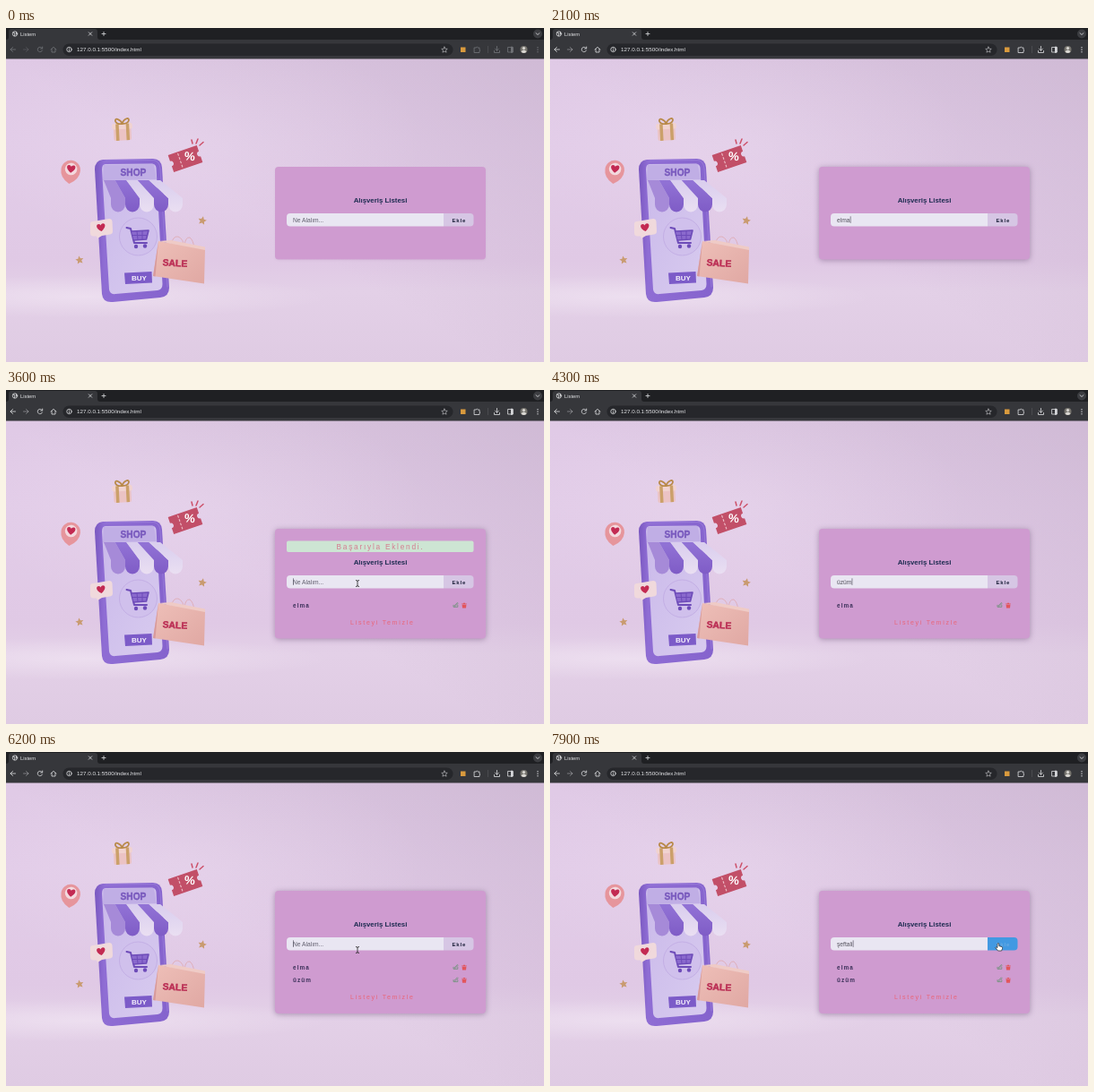
An HTML page for the animation above (8 s loop, 600 px wide and 373 px high).

```html
<!DOCTYPE html>
<html lang="tr">
<head>
<meta charset="utf-8">
<title>Listem</title>
<style>
  html, body { margin: 0; width: 100%; height: 100%; overflow: hidden; background: #dfc9e4; }
  svg { display: block; width: 100vw; height: 100vh; }
  text { font-family: "Liberation Sans", Arial, sans-serif; white-space: pre; }
  .bold { font-weight: 700; }
  .mid { text-anchor: middle; }
  .line { fill: none; stroke-linecap: round; stroke-linejoin: round; }
  .icons { color: #d5d6d9; }
  .icons .line { stroke: currentColor; stroke-width: .85; }
  #actions { color: #707276; }
  #actions.on { color: #d5d6d9; }
  .entry { font-size: 6.7px; }
</style>
</head>
<body>
<svg viewBox="0 0 600 373" preserveAspectRatio="none">
  <defs>
    <linearGradient id="wall" x1="0" y1="0" x2="0" y2="1">
      <stop offset="0" stop-color="#dfc9e5"/>
      <stop offset=".35" stop-color="#e2cce8"/>
      <stop offset=".7" stop-color="#e0c9e5"/>
      <stop offset=".79" stop-color="#e3d0e7"/>
      <stop offset="1" stop-color="#dfcbe3"/>
    </linearGradient>
    <linearGradient id="dusk" x1="1" y1="0" x2=".45" y2=".55">
      <stop offset="0" stop-color="#bda8c2" stop-opacity=".5"/>
      <stop offset="1" stop-color="#bda8c2" stop-opacity="0"/>
    </linearGradient>
    <radialGradient id="glow">
      <stop offset="0" stop-color="#f1e5f3" stop-opacity=".7"/>
      <stop offset="1" stop-color="#f1e5f3" stop-opacity="0"/>
    </radialGradient>
    <linearGradient id="body" x1="0" x2="1">
      <stop offset="0" stop-color="#7957c0"/>
      <stop offset=".12" stop-color="#8f6dd4"/>
      <stop offset="1" stop-color="#8563cd"/>
    </linearGradient>
    <linearGradient id="screen" x1="0" y1="0" x2="1" y2="1">
      <stop offset="0" stop-color="#cab9ea"/>
      <stop offset="1" stop-color="#d8cbef"/>
    </linearGradient>
    <linearGradient id="bag" x1="0" y1="0" x2="1" y2="1">
      <stop offset="0" stop-color="#eebfb8"/>
      <stop offset="1" stop-color="#e0a8a3"/>
    </linearGradient>
    <linearGradient id="violet" x1="0" y1="0" x2="0" y2="1">
      <stop offset="0" stop-color="#9273d6"/>
      <stop offset="1" stop-color="#7f5cc6"/>
    </linearGradient>
    <linearGradient id="pale" x1="0" y1="0" x2="0" y2="1">
      <stop offset="0" stop-color="#d9cdee"/>
      <stop offset="1" stop-color="#eadff2"/>
    </linearGradient>
    <path id="heart" d="M0 4.6C-6 .6-5.4-3.6-2.8-3.8C-1.2-4-.3-2.9 0-2C.3-2.9 1.2-4 2.8-3.8C5.4-3.6 6 .6 0 4.6Z" fill="#c32a52"/>
    <path id="star" d="M0-5L1.5-1.7L5-1.4L2.3 1L3.2 4.5L0 2.7L-3.2 4.5L-2.3 1L-5-1.4L-1.5-1.7Z"/>
    <g id="tools">
      <path class="line" d="M0 2.8V4.8H4.8V2.8M1 3.4L4.4 0L5.2 .8L1.9 4Z" stroke="#6d9278" stroke-width=".8"/>
      <path d="M9.2 .9H11V.2H13V.9H14.8V1.8H9.2ZM9.6 2.2H14.4L14 6H10Z" fill="#e2555c"/>
    </g>
  </defs>

  <rect width="600" height="373" fill="url(#wall)"/>
  <rect width="600" height="373" fill="url(#dusk)"/>
  <ellipse cx="210" cy="125" rx="260" ry="120" fill="url(#glow)" opacity=".35"/>
  <ellipse cx="90" cy="300" rx="270" ry="24" fill="url(#glow)"/>

  <!-- phone -->
  <path d="M108 147L164 146Q173 146 174 156L182 290Q182 300 172 301L119 306Q108 307 107 297L99 158Q99 148 108 147Z" fill="url(#body)"/>
  <path class="line" d="M111 148L164 147.500Q171 148 172 157L180 289" stroke="#9b7edb" stroke-width=".8"/>
  <path d="M111 152L163 151.500Q167 152 167.500 156L174.500 286Q174.500 292 169 293L122 297Q116 298 115 292L107 158Q107 152 111 152Z" fill="url(#screen)"/>
  <path d="M109 153L165 152L168 169L108 170Z" fill="#c0aee5"/>
  <text class="bold" x="127.500" y="164.500" font-size="10.200" fill="#7c5cc2" stroke="#6a4bb0" stroke-width=".3">SHOP</text>
  <circle cx="147.500" cy="233" r="21" fill="#d0c0ec" stroke="#bfaae2" stroke-width=".8"/>
  <g class="line" stroke="#6d4bb8" stroke-width="2">
    <path d="M134.500 223L139 224L143 240H157"/>
    <path d="M140 227L159 226L156.500 236L142.500 237" fill="#8a69cd" stroke-width="1.600"/>
    <path d="M146 227L147 236M152 227V236M141 231.500H157" stroke-width="1"/>
  </g>
  <g fill="#6d4bb8"><circle cx="145" cy="244" r="2.200"/><circle cx="155" cy="243.500" r="2.200"/></g>
  <path d="M132 273.500L162.500 272L163 284.500L133 286Z" fill="#7c5bc8"/>
  <text class="bold" x="140" y="282" font-size="8" fill="#f7f2fc">BUY</text>
  <g id="awning"></g>

  <!-- floating things -->
  <g transform="rotate(-3 130 114)">
    <rect x="120" y="109" width="19.500" height="16.500" rx="2" fill="#ebc3c4"/>
    <rect x="118.500" y="106.500" width="22.500" height="6.500" rx="2" fill="#f1d3d0"/>
    <path d="M122.500 107h3.500v18.500h-3.500zM134 107h3.500v18.500h-3.500z" fill="#cba06a"/>
    <path class="line" d="M130 107C121 107.500 121 100 125 101.500Q129 103 130 107C139 107.500 139 100 135 101.500Q131 103 130 107" stroke="#b98a4a" stroke-width="1.800"/>
  </g>
  <g transform="rotate(-19 200 146)">
    <path d="M183 136H217V143A3 3 0 0 0 217 149V156H183V149A3 3 0 0 0 183 143Z" fill="#c24f68"/>
    <path class="line" d="M194 138V154" stroke="#eebfc8" stroke-width="1.100" stroke-dasharray="2 2.500"/>
    <text class="bold mid" x="205.500" y="149.500" font-size="13.500" fill="#fff" transform="rotate(24 205.500 145)">%</text>
  </g>
  <path class="line" d="M208 129L207 125M212 129L214 124M216 131L220 127.500" stroke="#cd5069" stroke-width="1.500"/>
  <g transform="rotate(6 72 158)">
    <path d="M72 174Q61 168 61.500 158.500A10.700 10.700 0 0 1 83 158.500Q83 168 72 174Z" fill="#e6959c"/>
    <circle cx="72.500" cy="157.500" r="6.800" fill="#f3d9de"/>
    <use href="#heart" x="72.500" y="157"/>
  </g>
  <path d="M97 216L115 213Q118 213 118.500 216L119 227Q119 230 116 230.500L107 232L102 235L101 232.500L97 232.500Q94 232 94 229V219Q94 216 97 216Z" fill="#f0d9dc"/>
  <use href="#heart" transform="translate(106 222.500) rotate(-8)"/>
  <use href="#star" transform="translate(219 215) rotate(12) scale(.95)" fill="#c99b70"/>
  <use href="#star" transform="translate(82 259) rotate(-10) scale(.9)" fill="#c99b70"/>

  <!-- bag -->
  <path class="line" d="M184 242Q186 232 192 233Q198 235 199 246M199 243Q200 233 205 234Q209 237 210 246" stroke="#dfacb5" stroke-width=".9"/>
  <path d="M170 238L222 247L221 285.500L164 277Z" fill="url(#bag)"/>
  <path d="M170 238L184 237L222 244.500V248Z" fill="#efcbc6"/>
  <path d="M170 238L164 277L166.500 277.500Z" fill="#d79a9c"/>
  <text class="bold" x="174.500" y="266" font-size="10.400" fill="#c33058" stroke="#ad244b" stroke-width=".4" transform="rotate(3 188 264)">SALE</text>

  <!-- card -->
  <rect id="card" x="300" y="155" width="235" rx="4" fill="#cf9bd0"/>
  <g id="alert">
    <rect x="313" y="168.500" width="208.500" height="12.500" rx="2" fill="#cde5d3"/>
    <text x="368.500" y="178" font-size="8.300" letter-spacing="1.750" fill="#d47d90">Başarıyla Eklendi.</text>
  </g>
  <text class="bold mid" x="417.500" y="195" font-size="7.850" fill="#1d2c50">Alışveriş Listesi</text>
  <path d="M317 207H488V221.500H317Q313 221.500 313 217.500V211Q313 207 317 207Z" fill="#e9e6f2"/>
  <path id="button" d="M488 207H517.500Q521.500 207 521.500 211V217.500Q521.500 221.500 517.500 221.500H488Z"/>
  <text id="label" class="bold" x="497.500" y="216.500" font-size="6" letter-spacing=".8">Ekle</text>
  <text id="hint" class="entry" x="320" y="216.500" fill="#62606f">Ne Alalım...</text>
  <text id="typed" class="entry" x="320" y="216.500" fill="#56545f"></text>
  <rect id="caret" y="210.300" width=".6" height="7.600" fill="#44414f"/>
  <g id="items"></g>
  <text id="clear" x="384" font-size="7" letter-spacing="1.750" fill="#e9667a">Listeyi Temizle</text>

  <!-- browser -->
  <rect width="600" height="14" fill="#1f2023"/>
  <path d="M0 13Q3 13 3 10V4Q3 1 6 1H99Q102 1 102 4V10Q102 13 105 13H600V34.500H0Z" fill="#36373b"/>
  <rect id="omni" x="63.500" y="17.500" width="435" height="13.500" rx="6.750" fill="#26272b"/>
  <rect id="selection" x="78.500" y="20.500" width="73.500" height="7.500" fill="#91b9e8"/>
  <text x="16" y="8.500" font-size="5.800" fill="#e2e3e5">Listem</text>
  <text id="url" x="79" y="26.300" font-size="6.250">127.0.0.1:5500/index.html</text>
  <g class="icons">
    <circle cx="593" cy="6.500" r="5" fill="#3c3d41"/>
    <g class="line">
      <circle cx="10" cy="6.500" r="2.700"/><path d="M8 5L10 6L9.500 8.500M11.500 4.500V7"/>
      <path d="M92.300 4.800L95.700 8.200M95.700 4.800L92.300 8.200M107 6.500H111M109 4.500V8.500"/>
      <circle cx="70.500" cy="24" r="2.700"/><path d="M70.500 24V25.500M70.500 22.500V22.600"/>
      <use href="#star" transform="translate(489 24.300) scale(.65)"/>
      <path d="M591 5.700L593 7.500L595 5.700"/>
    </g>
  </g>
  <g id="actions" class="icons">
    <g class="line">
      <path d="M10.500 24H5M7.500 21.500L5 24L7.500 26.500"/>
      <path d="M19.500 24H25M22.500 21.500L25 24L22.500 26.500" opacity=".5"/>
      <path d="M40.300 22.600A2.700 2.700 0 1 0 40.500 25M40.700 21V23H38.700"/>
      <path d="M50 24L53 21.300L56 24M51 23.500V27H55V23.500"/>
      <path d="M522.500 22H524.500Q525 20 526.500 22H528V24Q529.500 25 528 26V27.500H522.500Z"/>
      <path d="M547.500 20.500V25M545.500 23.300L547.500 25.200L549.500 23.300M544.500 25.500V27.500H550.500V25.500"/>
      <path d="M560 21.500H565.500V27H560Z"/><path d="M564 21.500V27" stroke-width="2"/>
    </g>
    <g fill="currentColor"><circle cx="593" cy="21.700" r=".7"/><circle cx="593" cy="24.200" r=".7"/><circle cx="593" cy="26.700" r=".7"/></g>
  </g>
  <rect x="507" y="21.500" width="5.500" height="5.500" fill="#d99a3d"/>
  <path d="M537.500 20V28" stroke="#55565a" stroke-width=".7"/>
  <circle cx="577.500" cy="24" r="4" fill="#77756f"/>
  <path d="M574.500 26.500Q577.500 22.500 580.500 26.500Q577.500 29.500 574.500 26.500Z" fill="#dad8d3"/><circle cx="577.500" cy="22.500" r="1.600" fill="#dad8d3"/>

  <g id="cursor">
    <path id="arrow" d="M0 0V9L2.200 7L3.800 10.300L5.200 9.700L3.700 6.500H6.500Z" fill="#111" stroke="#fff" stroke-width=".6"/>
    <path id="beam" class="line" d="M-1.600-3.500Q0-3.500 0-2.500Q0-3.500 1.600-3.500M0-2.500V2.500M-1.600 3.500Q0 3.500 0 2.500Q0 3.500 1.600 3.500" stroke="#222" stroke-width=".8"/>
    <path id="hand" d="M-1-3Q0-4 .8-3V-.3L4 .5Q4.800 1 4.500 2.500L3.600 5H-.4L-3.200 1.600Q-3.200.4-1 1.500Z" fill="#fff" stroke="#222" stroke-width=".7"/>
  </g>
</svg>
<script>
const $ = id => document.getElementById(id);
const show = (id, on) => { $(id).style.display = on ? "" : "none"; };
const clamp = v => Math.max(0, Math.min(1, v));
const ease = v => v * v * (3 - 2 * v);
const mix = (a, b, p) => a + (b - a) * p;
const blend = (a, b, p) => `rgb(${a.map((v, i) => Math.round(mix(v, b[i], p)))})`;

const LOOP = 8000, ALERT = 1000, FADE = 250;
const rounds = [
  { word: "elma", focus: 1250, type: 1500, step: 140, still: 2250, click: 2950 },
  { word: "üzüm", focus: 3500, type: 3800, step: 120, still: 4450, click: 5000 },
  { word: "şeftali", focus: 5950, type: 6500, step: 125, still: 7400, click: Infinity }
];
// time, x, y
const path = [
  [250, 180, 60], [400, 140, 24], [520, 140, 24], [780, 377, 215],
  [2300, 377, 215], [2700, 500, 217], [3100, 500, 217], [3450, 392, 216],
  [4450, 392, 216], [4800, 500, 217], [5300, 500, 217], [5800, 392, 221],
  [7400, 392, 221], [7700, 500, 217]
];
const hovers = [[2650, 3140], [4750, 5350], [7600, LOOP + FADE]];

// The leftmost stripe lies in shadow.
$("awning").innerHTML = [0, 1, 2, 3, 4].map(i => {
  const x = 109 + 12.6 * i, foot = 117 + 16 * i;
  const fill = i % 2 ? "url(#violet)" : i ? "url(#pale)" : "#a68ad8";
  return `<path d="M${x} 170H${x + 12.6}L${foot + 16} 190V197A8 8.500 0 0 1 ${foot} 197V190Z" fill="${fill}"/>`;
}).join("");
$("items").innerHTML = rounds.slice(0, 2).map((r, i) =>
  `<g transform="translate(0 ${14.3 * i})"><text class="bold" x="320" y="243" font-size="6.400" letter-spacing="1.100" fill="#3a3058">${r.word}</text><use href="#tools" x="499" y="237.500"/></g>`
).join("");

function place(t) {
  const i = path.findIndex(p => p[0] > t);
  if (i < 0) return path[path.length - 1].slice(1);
  if (!i) return path[0].slice(1);
  const a = path[i - 1], b = path[i], p = ease((t - a[0]) / (b[0] - a[0]));
  return [mix(a[1], b[1], p), mix(a[2], b[2], p)];
}

function drawCursor(t) {
  const [x, y] = place(t);
  const typing = rounds.some(r => t >= r.type && t < r.still);
  const inRow = y > 207 && y < 222;
  const onButton = inRow && x >= 488 && x < 522;
  const onText = (inRow && x > 313 && x < 488) || (y > 17 && y < 31);
  $("cursor").setAttribute("transform", `translate(${x} ${y})`);
  show("cursor", t >= path[0][0] && !typing);
  show("hand", onButton);
  show("beam", onText);
  show("arrow", !onButton && !onText);
}

function drawForm(t) {
  const round = rounds.find(r => t < r.click);
  const count = rounds.filter(r => t >= r.click).length;
  const length = t < round.type ? 0 : Math.floor((t - round.type) / round.step) + 1;
  const word = round.word.slice(0, length);
  $("typed").textContent = word;
  show("hint", !word);
  show("caret", t >= round.focus);
  $("caret").setAttribute("x", 320 + (word ? $("typed").getComputedTextLength() + .3 : 0));

  [...$("items").children].forEach((el, i) => { el.style.display = i < count ? "" : "none"; });
  show("clear", count > 0);
  $("clear").setAttribute("y", 247.7 + 14.3 * count);
  show("alert", rounds.some(r => t >= r.click && t < r.click + ALERT));

  const lift = clamp((t - 700) / 400);
  $("card").setAttribute("height", count ? 108 + 14.5 * count : 103.5);
  $("card").style.filter = `drop-shadow(0 1px ${mix(1, 3, lift)}px rgba(70,40,85,${mix(.06, .38, lift)}))`;

  const heat = Math.max(...hovers.map(([a, b]) => Math.min(clamp((t - a) / FADE), 1 - clamp((t - b) / FADE))));
  $("button").style.fill = blend([214, 198, 228], [66, 153, 226], heat);
  $("label").style.fill = blend([29, 32, 58], [104, 170, 226], heat);
}

function drawBrowser(t) {
  const selected = t >= 450 && t < rounds[0].focus;
  $("actions").classList.toggle("on", t >= 300);
  show("selection", selected);
  $("url").style.fill = selected ? "#16233a" : "#e6e7ea";
  $("omni").style.stroke = selected ? "#a9c4ee" : "none";
}

function frame(now) {
  const t = now % LOOP;
  drawBrowser(t);
  drawForm(t);
  drawCursor(t);
  requestAnimationFrame(frame);
}
frame(performance.now());
</script>
</body>
</html>
```
